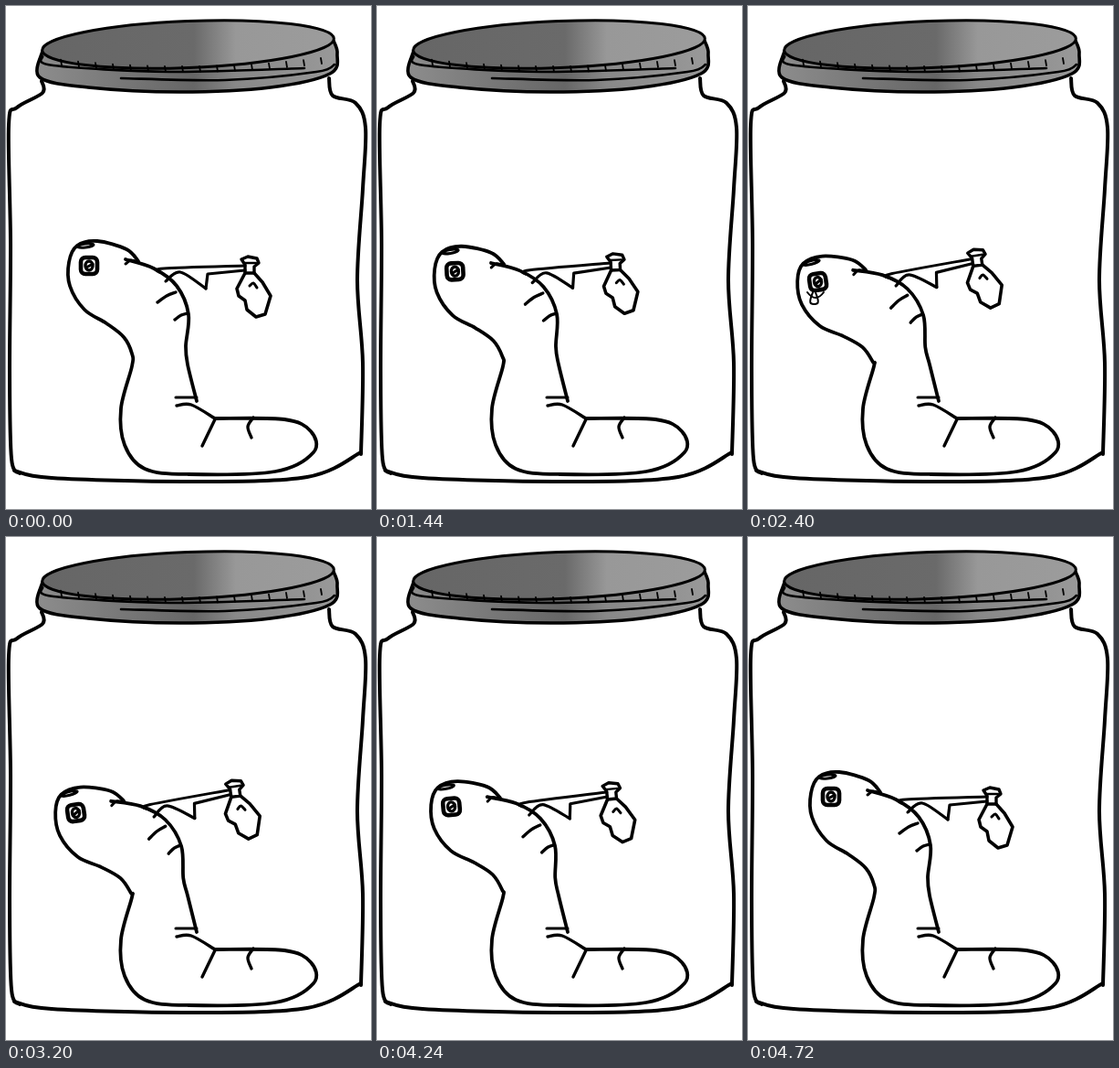
Animation of 400x550 px, one loop 4880 ms. Source, as an HTML page with a canvas:

```html
<!DOCTYPE html>
<html lang="en">
<head>
<meta charset="utf-8">
<title>Worm in a jar</title>
<style>
html, body { margin: 0; width: 100%; height: 100%; overflow: hidden; background: #fff; }
canvas { display: block; }
</style>
</head>
<body>
<canvas id="stage" width="400" height="550"></canvas>
<script>
const ctx = document.getElementById('stage').getContext('2d');
const LOOP = 4880, STEP = 160, POSES = 5;
const MAX_ANGLE = 0.147;
const PIVOT = { x: 203, y: 391 };

// "x,y x,y ..." to a list of points
const pts = s => s.trim().split(/\s+/).map(p => p.split(',').map(Number));

// Smooth path through all points
function spline(p) {
  const path = new Path2D();
  const at = i => p[Math.max(0, Math.min(p.length - 1, i))];
  path.moveTo(...p[0]);
  for (let i = 0; i < p.length - 1; i++) {
    const [a, b, c, d] = [-1, 0, 1, 2].map(k => at(i + k));
    path.bezierCurveTo(b[0] + (c[0] - a[0]) / 6, b[1] + (c[1] - a[1]) / 6,
      c[0] - (d[0] - b[0]) / 6, c[1] - (d[1] - b[1]) / 6, c[0], c[1]);
  }
  return path;
}

function stroke(path, width) {
  ctx.lineWidth = width;
  ctx.stroke(path);
}
const curve = (s, width = 3.4) => stroke(spline(pts(s)), width);
const lines = (s, width = 3.4) => stroke(new Path2D('M' + s), width);

function ellipse(x, y, rx, ry, turn = 0) {
  const path = new Path2D();
  path.ellipse(x, y, rx, ry, turn, 0, 2 * Math.PI);
  return path;
}

function rotate(points, angle) {
  const c = Math.cos(angle), s = Math.sin(angle);
  return points.map(([x, y]) => {
    const dx = x - PIVOT.x, dy = y - PIVOT.y;
    return [PIVOT.x + dx * c + dy * s, PIVOT.y - dx * s + dy * c];
  });
}

function paint(path, width, ...colors) {
  const g = ctx.createLinearGradient(36, 0, 363, 0);
  [0, 0.52, 0.66, 1].forEach((at, i) => g.addColorStop(at, colors[i]));
  ctx.fillStyle = g;
  ctx.fill(path);
  stroke(path, width);
}

function drawJar() {
  curve('39,82 40,95 12,111 3,130 5,260 4,400 6,495 15,511', 4);
  curve('9,508 50,516 200,520 330,515 389,488', 4);
  curve('354,79 358,98 383,106 394,133 391,200 385,300 391,390 389,490', 4);

  paint(spline(pts('40,49 37,78 90,89 190,94 290,89 355,74 363,52 359,38')), 3.6,
    '#8c8c8c', '#666', '#888', '#999');
  paint(ellipse(199.5, 42, 160, 25.5, -0.04), 3, '#666', '#6a6a6a', '#989898', '#9c9c9c');
  curve('40,55 52,65 180,72 327,68', 2.6);
  curve('126,79 240,81 340,72 360,64', 2.6);
  for (let x = 60; x < 350; x += 19) {
    const y = 68 - ((x - 195) / 50) ** 2;
    lines(`${x},${y - 2} l1,6`, 1.8);
  }
}

const HEAD = pts('145,279 132,266 100,257 78,262 69,280 70,306 86,332 110,347 129,362 138,380');
const BODY = pts('138,394 126,440 130,480 152,506 200,512 295,509 337,488 334,465 305,452 229,451');
const BACK = pts('131,277 162,287 187,306 200,337 197,372');
const WAIST = pts('199,392 209,432');

function drawUpper() {
  curve('131,282 137,278 146,281', 3);
  // mouth and eye
  stroke(ellipse(87, 262, 9, 2, -0.1), 3);
  const eye = new Path2D();
  eye.roundRect(82, 275, 18, 18, 5);
  stroke(eye, 4.6);
  stroke(ellipse(91, 284, 4, 5), 3.4);
  lines('88,286 95,282', 3);
  // creases
  curve('166,324 176,317 186,313');
  curve('185,343 192,338 199,336');
  // arm and stick
  curve('168,291 173,287 262,284', 3);
  curve('175,301 191,291 219,309', 3.2);
  lines('219,309 221,293 262,289', 3.2);
  // bundle
  lines('262,283 L258,277 265,274 275,276 277,281 272,285 V292 H262 Z', 3.4);
  lines('261,281 H274', 2.4);
  lines('262,292 L253,309 255,317 262,322 264,332 274,340 284,337 290,317 281,302 272,292', 3.6);
  curve('267,306 271,303 275,308', 3);
}

// The drop wells up below the eye, then slides down
function drawTear(t) {
  const n = Math.floor((t - 2240) / STEP);
  if (n < 0 || n > 5) return;
  ctx.fillStyle = '#fff';
  if (n > 0) {
    const drop = new Path2D(`M72.5,${310 + 8 * (n - 1)} c8,17 3,16 0,16 s-8,1 0,-16`);
    ctx.fill(drop);
    stroke(drop, 2);
  }
  if (n < 2) stroke(new Path2D('M65,313 Q74,325 83,313'), 2);
}

function drawWorm(t) {
  const up = Math.floor(t / STEP) - 7, down = Math.ceil((LOOP - t) / STEP) - 1;
  const u = Math.max(0, Math.min(POSES, up, down)) / POSES;
  const ease = 0.7 * u * u * (3 - 2 * u) + 0.3 * u;
  const angle = ease * MAX_ANGLE;
  const outline = spline([...rotate(HEAD, angle), ...BODY]);

  ctx.save();
  ctx.translate(PIVOT.x, PIVOT.y);
  ctx.rotate(-angle);
  ctx.translate(-PIVOT.x, -PIVOT.y);
  drawUpper();
  ctx.restore();

  ctx.save();
  ctx.clip(outline);
  drawTear(t);
  ctx.restore();

  stroke(outline, 3.8);
  stroke(spline([...rotate(BACK, angle), ...WAIST]), 3.8);
  lines('186,428 H209', 3);
  curve('187,437 203,436 229,451');
  lines('229,452 L215,481');
  curve('271,450 265,460 269,472');
}

function frame(now) {
  ctx.fillStyle = '#fff';
  ctx.fillRect(0, 0, 400, 550);
  ctx.strokeStyle = '#000';
  ctx.lineCap = ctx.lineJoin = 'round';
  drawJar();
  drawWorm(now % LOOP);
  requestAnimationFrame(frame);
}
frame(0);
</script>
</body>
</html>
```
